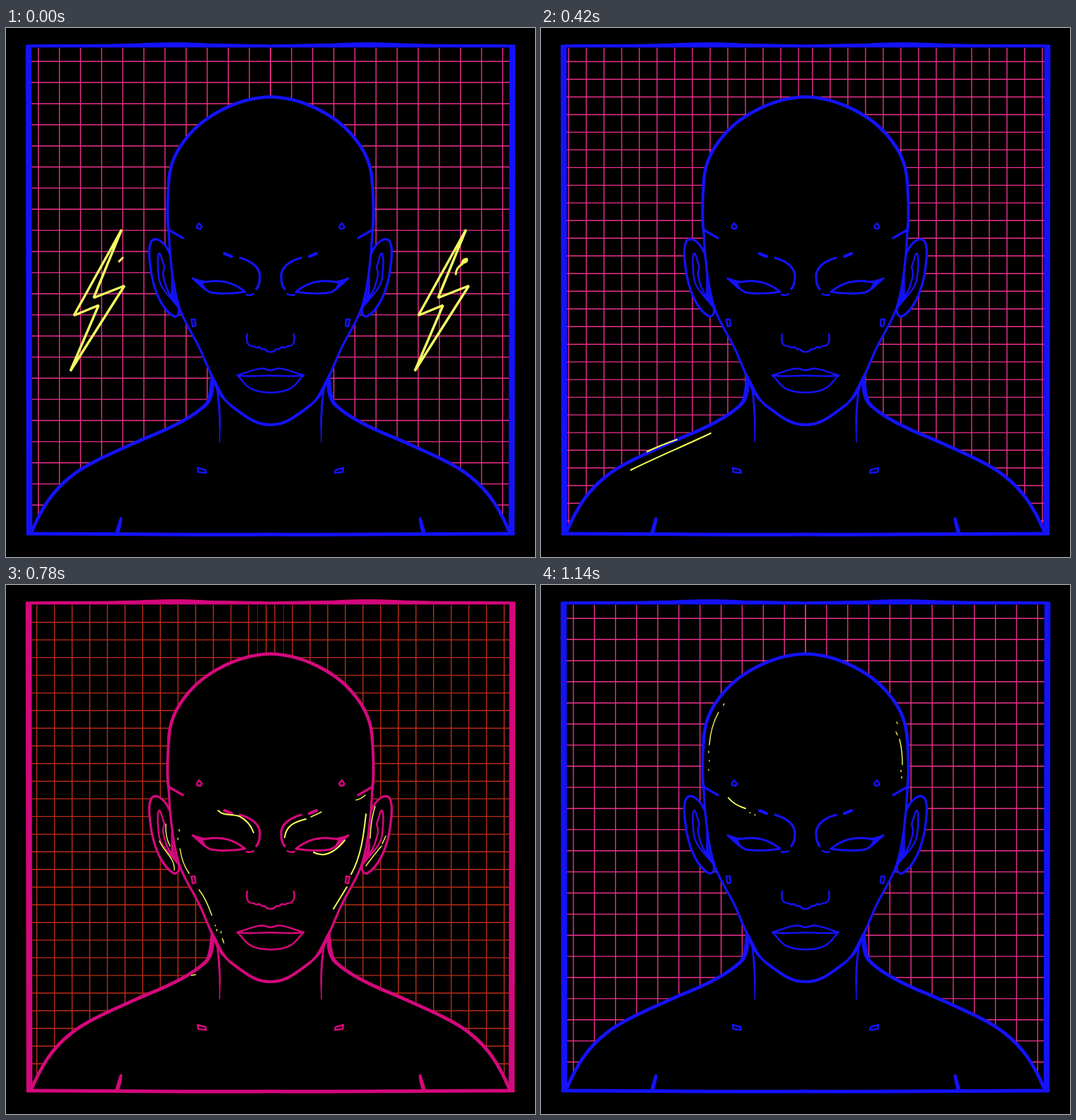
An HTML page without scripts for the animation above (1200 ms loop, 748 px wide and 748 px high).

```html
<!DOCTYPE html>
<html lang="en">
<head>
<meta charset="utf-8">
<title>Neon portrait</title>
<style>
html, body { margin: 0; width: 100%; height: 100%; overflow: hidden; background: #000; }
svg { display: block; width: 100%; height: 100%; fill: none; stroke-linecap: round; stroke-linejoin: round; }

.ink, .grid, .layer, .spark, .bolt { animation: 1.2s step-end infinite; }
.ink { stroke: currentColor; animation-name: ink; }
.solid { fill: currentColor; stroke-width: 1; }
.skin { fill: #000; stroke: none; }
.grid { animation-name: grid; stroke-linecap: butt; }
.a { animation-name: grid-a; }
.b { animation-name: grid-b; }
.c { animation-name: grid-c; }
.spark { stroke: #f8ff58; stroke-width: 2; opacity: 0; }
.thin { stroke-width: 1.4; }
.bolt { stroke: #f5ff62; stroke-width: 3.4; stroke-linejoin: miter; stroke-miterlimit: 2.5; animation-name: bolt; }
.s0 { animation-name: s0; }
.s1 { animation-name: s1; }
.s2 { animation-name: s2; }
.s3 { animation-name: s3; }
.s4 { animation-name: s4; }
.s5 { animation-name: s5; }
.s6 { animation-name: s6; }

@keyframes ink {
  0% { color: #1412fa; }
  45% { color: #1412fa; animation-timing-function: steps(2); }
  55% { color: #ab0796; animation-timing-function: steps(4); }
  75% { color: #ff0861; animation-timing-function: steps(4); }
  95%, 100% { color: #1412fa; }
}
@keyframes grid {
  0% { stroke: #ee308e; }
  45% { stroke: #ee308e; animation-timing-function: steps(2); }
  55% { stroke: #d95424; animation-timing-function: steps(4); }
  75% { stroke: #a0040c; animation-timing-function: steps(4); }
  95%, 100% { stroke: #ee308e; }
}
@keyframes grid-a {
  0%, 15%, 30%, 45%, 60%, 75%, 95%, 100% { opacity: 1; }
  5%, 20%, 35%, 50%, 65%, 80% { opacity: 0; }
}
@keyframes grid-b {
  0%, 15%, 25%, 45%, 60%, 70%, 90%, 100% { opacity: 0; }
  10%, 20%, 40%, 55%, 65%, 85% { opacity: 1; }
}
@keyframes grid-c {
  0%, 10%, 30%, 40%, 55%, 75%, 85%, 95%, 100% { opacity: 0; }
  5%, 25%, 35%, 50%, 70%, 80%, 90% { opacity: 1; }
}
@keyframes bolt {
  0% { transform: none; opacity: 1; animation-timing-function: steps(4); }
  19.99% { transform: translateY(42px); opacity: 1; }
  20%, 100% { transform: translateY(42px); opacity: 0; }
}
@keyframes s0 { 0% { opacity: 1; } 10%, 100% { opacity: 0; } }
@keyframes s1 { 0%, 20%, 100% { opacity: 0; } 10% { opacity: 1; } }
@keyframes s2 { 0%, 35%, 100% { opacity: 0; } 20% { opacity: 1; } }
@keyframes s3 { 0%, 50%, 100% { opacity: 0; } 35% { opacity: 1; } }
@keyframes s4 { 0%, 65%, 100% { opacity: 0; } 50% { opacity: 1; } }
@keyframes s5 { 0%, 85%, 100% { opacity: 0; } 65% { opacity: 1; } }
@keyframes s6 { 0% { opacity: 0; } 85%, 100% { opacity: 1; } }
</style>
</head>
<body>
<svg viewBox="0 0 748 748">
  <defs>
    <clipPath id="inside"><path d="M35 28H713V712H35Z"/></clipPath>

    <!-- wide dashed strokes form the evenly spaced grid lines -->
    <path id="cols-a" d="M45 370H374.7" stroke-width="684" stroke-dasharray="1.4 28.45"/>
    <path id="cols-b" d="M42.9 370H374" stroke-width="684" stroke-dasharray="1.4 23.55"/>
    <path id="cols-c" d="M38.4 370H374" stroke-width="684" stroke-dasharray="1.4 23.6"/>

    <g id="half">
      <g class="skin">
        <path d="M375 500H292L290 505C289 518 288 526 281 534C262 552 230 567 197 580C150 601 112 617 92 634C65 655 50 680 36 714H375Z"/>
        <path d="M231 318C225 303 212 294 206 301C200 310 203 330 206 350C211 375 222 400 238 408C244 408 246 402 244 394"/>
        <path d="M375 97C330 98 283 123 259 151C238 175 231 196 230 220C228 250 228 275 230 287C231 320 236 370 246 398C256 425 270 440 280 467C289 487 299 517 317 533C340 550 352 561 375 561Z"/>
      </g>
      <path stroke-width="4.8" d="M291 500C290 516 289 526 281 534C262 552 230 567 197 580C150 601 112 617 92 634C65 655 50 680 36 713"/>
      <path stroke-width="4.6" d="M374 97.5C330 98 283 123 259 151C238 175 231 196 230 220"/>
      <path stroke-width="4" d="M230 220C228 250 228 275 230 287M317 533C340 550 352 561 374 561"/>
      <path stroke-width="3.3" d="M230 287C231 320 236 370 246 398C256 425 270 440 280 467C289 487 299 517 317 533M231 318C225 303 212 294 206 301C200 310 203 330 206 350C211 375 222 400 238 408C244 408 246 402 244 394"/>
      <g class="solid">
        <path d="M234 350C235 370 239 385 245 395L234 379Z"/>
        <path d="M290 487C299 503 304 517 316 533C302 523 298 512 294 503C294 520 289 531 281 537C286 522 289 512 290 487Z"/>
        <path d="M297 505C304 525 304 560 302 586C302 560 301 530 297 505Z"/>
        <path d="M264 354L284 359L278 361L283 370C275 365 271 358 264 354Z"/>
        <path d="M155 713L161 693Q164 690 164 695Q163 704 160 713Z"/>
        <path d="M29 24C100 23 150 24 200 21.5Q250 19.5 290 22.5Q340 23 374 24V27H30Z"/>
      </g>
      <g stroke-width="2.5">
        <path d="M224 338C220 328 219 317 216 319C213 325 215 340 216 352C217 367 231 379 243 394M224 338C220 348 223 354 225 361C228 375 236 382 243 394"/>
        <path d="M273 276L277 281L275 284L270 283L270 280ZM262 412L267 412L268 421L264 422ZM271 622L282 625L283 629L272 628Z"/>
        <path d="M340 377Q346 379 350 376"/>
        <path d="M341 433C339 445 342 450 350 450L354 452L358 451L362 454L366 454C368 457 371 458 374 458"/>
        <path d="M374 484C369 484 367 481 361 481.5C350 482 340 488 327 491C345 494 360 491 374 491.5M327 491C338 500 338 515 374 515.5"/>
      </g>
      <path stroke-width="3" d="M264 354C275 359 280 360 290 358C310 356 325 362 338 373C320 376 300 376 290 374C280 371 273 361 264 354Z"/>
      <path stroke-width="3.3" d="M231 286L250 297M331 325C348 330 358 338 359 350C359 360 357 366 354 369"/>
      <path stroke-width="4.2" d="M309 319L319 323"/>
      <path stroke-width="5" d="M31 715C150 715 300 717 374 716"/>
      <path stroke-width="8.5" stroke-linecap="butt" d="M32 24L33 717"/>
    </g>

    <path id="zap" d="M163.5 285L124 381.5L167.5 364.5L91 485L131 392L96 406.5Z"/>
  </defs>

  <path fill="#000" d="M0 0H748V748H0Z"/>

  <g class="grid" clip-path="url(#inside)">
    <g class="layer a">
      <use href="#cols-a"/>
      <use href="#cols-a" transform="matrix(-1 0 0 1 748 0)"/>
      <path d="M374 46.5V712" stroke-width="680" stroke-dasharray="1.4 28.47"/>
    </g>
    <g class="layer b">
      <use href="#cols-b"/>
      <use href="#cols-b" transform="matrix(-1 0 0 1 748 0)"/>
      <path d="M374 52V712" stroke-width="680" stroke-dasharray="1.4 23.57"/>
      <path d="M355.5 28V97M392.5 28V97" opacity=".6"/>
    </g>
    <g class="layer c">
      <use href="#cols-c"/>
      <use href="#cols-c" transform="matrix(-1 0 0 1 748 0)"/>
      <path d="M374 46.8V712" stroke-width="680" stroke-dasharray="1.4 23.58"/>
    </g>
  </g>

  <g class="ink">
    <use href="#half"/>
    <use href="#half" transform="matrix(-1 0 0 1 748 0)"/>
  </g>

  <g class="bolt">
    <use href="#zap"/>
    <use href="#zap" x="487"/>
  </g>

  <g class="spark s0">
    <path stroke-width="3" d="M160 330L165 325M636 348Q637 338 645 334"/>
    <path d="M644 333Q645 326 652 326Q654 332 644 333Z" fill="#f8ff58"/>
  </g>
  <g class="spark s1">
    <path d="M147 350C147 362 154 370 139 383"/>
    <path d="M637 348C638 360 648 372 629 385C649 378 643 361 638 348Z" fill="#f8ff58"/>
  </g>
  <g class="spark s2">
    <path d="M146 409L152 407L158 410M147 439Q160 436 167 431Q169 425 165 419M590 498L582 502Q582 510 585 518L585 525L581 527M597 499L611 492M573 534H575M579 532H580"/>
    <path stroke-width="3" d="M167 431Q169 425 165 420"/>
  </g>
  <path class="spark s3" d="M150 599Q169 590 192 582M127 625C165 606 200 592 240 573"/>
  <g class="spark s4">
    <path d="M515 316C510 350 508 385 491 410M489 424L487 428M478 437C460 462 445 505 419 540M539 306C544 320 540 345 532 366M532 368C525 388 518 402 508 400M612 617C640 628 670 645 690 694"/>
    <path stroke-width="3.5" d="M500 385Q497 399 491 410M450 490Q438 517 420 539"/>
    <path class="thin" d="M60 683C80 650 120 625 160 607C190 593 205 588 219 582M222 581L227 579M233 578L236 577M246 571L251 570M252 568C258 556 290 551 296 518"/>
  </g>
  <g class="spark s5">
    <path d="M300 319C308 327 317 323 330 327Q345 335 350 350M394 357C396 340 408 335 424 331M435 378C450 386 465 378 479 361M509 324C506 350 503 382 488 409M482 427L463 458"/>
    <path class="thin" d="M431 328L446 321M495 304Q502 303 508 297M522 313Q516 330 515 358M537 355L532 366M531 369Q520 382 509 397M217 362C223 377 239 386 238 403M226 338Q225 357 232 369M273 431Q283 444 291 467"/>
    <path class="thin" d="M245 346V348M243 358V360M246 373Q249 394 259 408M296 481V482M298 487V489M304 490V492M306 500L308 506M262 552L268 551"/>
  </g>
  <g class="spark s6">
    <path d="M265 301Q273 311 289 316"/>
    <path class="thin" d="M258 170L259 168M251 180Q240 200 238 226M237 235V237M238 248V249M237 261V262M295 322H296M302 325H303M503 194L504 196M502 208L504 212M507 218Q511 234 511 254M509 262V264M510 271V273"/>
  </g>
</svg>
</body>
</html>
```
